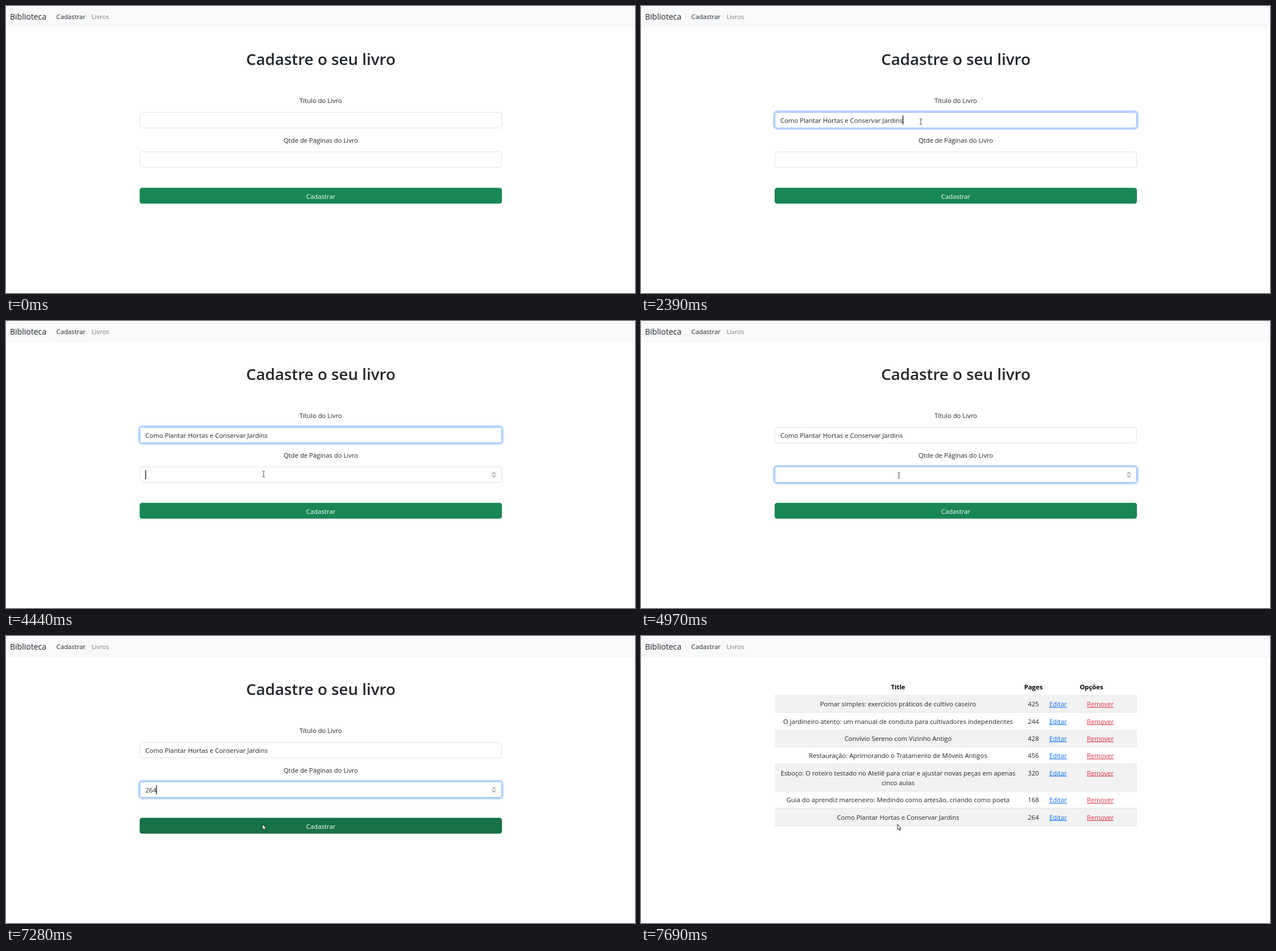
An HTML page for the animation above (8 s loop, 1106x506 px).

```html
<!DOCTYPE html>
<html lang="pt-BR">
<head>
<meta charset="utf-8">
<title>Biblioteca</title>
<style>
  html, body { margin: 0; width: 100%; height: 100%; overflow: hidden; background: #fff; }
  svg { display: block; }
  text { font: 11.3px "Open Sans", "Noto Sans", sans-serif; fill: #212529; }
  .brand { font-size: 14px; }
  .heading { font-size: 27.7px; font-weight: 600; }
  .mid { text-anchor: middle; }
  .head { font-weight: 700; fill: #000; }
  .muted { fill: #7b7c7d; }
  .edit { fill: #0d6efd; text-decoration: underline; }
  .remove { fill: #dc3545; text-decoration: underline; }
  .field { fill: #fff; stroke: #dee2e6; }
  .ring { fill: none; }
  .line { stroke: #dee2e6; }
</style>
</head>
<body>
<svg id="stage" width="1106" height="506" viewBox="0 0 1106 506">
  <rect width="1106" height="38.5" fill="#f8f9fa"/>
  <text class="brand" x="7" y="23.5">Biblioteca</text>
  <text x="88.5" y="22.5">Cadastrar</text>
  <text class="muted" x="150.5" y="22.5">Livros</text>

  <g id="form">
    <text class="heading mid" x="553.5" y="103.5">Cadastre o seu livro</text>
    <text class="mid" x="553.5" y="171">Título do Livro</text>
    <rect class="ring" id="titleRing"/>
    <rect class="field" id="titleField" x="235.5" y="187.5" width="636" height="27.5" rx="4.3"/>
    <text id="titleText" x="245" y="206"></text>
    <text class="mid" x="553.5" y="240.7">Qtde de Páginas do Livro</text>
    <rect class="ring" id="pagesRing"/>
    <rect class="field" id="pagesField" x="235.5" y="257" width="636" height="27.5" rx="4.3"/>
    <text id="pagesText" x="245" y="275.7"></text>
    <g id="spinner">
      <rect x="853.5" y="265" width="8.5" height="12" rx="1" fill="#efefef"/>
      <path d="M855.5 269.5l2.3-2.3 2.3 2.3M855.5 272.5l2.3 2.3 2.3-2.3" fill="none" stroke="#555"/>
    </g>
    <rect class="ring" id="buttonRing"/>
    <rect id="button" x="235" y="320.5" width="637" height="28" rx="4.3"/>
    <text class="mid" x="553.5" y="339.5" style="fill:#fff">Cadastrar</text>
    <rect id="caret" width="1.2" height="16" fill="#000"/>
  </g>

  <g id="table">
    <text class="head mid" x="452" y="94">Title</text>
    <text class="head mid" x="690" y="94">Pages</text>
    <text class="head mid" x="792" y="94">Opções</text>
    <path class="line" d="M235 104.5H872"/>
  </g>

  <path id="beam" d="M-2-5H-.6L0-4.4.6-5H2M0-4.4V4.4M-2 5H-.6L0 4.4.6 5H2" fill="none" stroke="#444"/>
  <path id="arrow" d="M0 0V9.6L2.2 7.6 3.7 11 5.2 10.3 3.8 7H6.6Z" fill="#fff" stroke="#222" stroke-width=".9" stroke-linejoin="round"/>
</svg>
<script>
const LOOP = 8000, BLINK = 525;
const TITLE = 'Como Plantar Hortas e Conservar Jardins';
const TIMES = { title: 1320, paste: 2390, pages: 4440, hover: 6950, submit: 7510, list: 7690 };
const DIGITS = [5370, 5960, 6220];
const RESETS = [TIMES.title, TIMES.paste, TIMES.pages, ...DIGITS];

const BOOKS = [
  [['Pomar simples: exercícios práticos de cultivo caseiro'], 425],
  [['O jardineiro atento: um manual de conduta para cultivadores independentes'], 244],
  [['Convívio Sereno com Vizinho Antigo'], 428],
  [['Restauração: Aprimorando o Tratamento de Móveis Antigos'], 456],
  [['Esboço: O roteiro testado no Ateliê para criar e ajustar novas peças em apenas', 'cinco aulas'], 320],
  [['Guia do aprendiz marceneiro: Medindo como artesão, criando como poeta'], 168],
  [[TITLE], 264]
];

// Pointer moves: start, end, number of steps, way points
const MOVES = [
  [500, 1100, 9, [[950, 594], [890, 310], [600, 226], [505, 206]]],
  [1590, 1660, 2, [[505, 206], [492, 204]]],
  [3260, 4020, 12, [[492, 204], [484, 216], [470, 236], [453, 249], [452, 258]]],
  [4090, 4300, 4, [[452, 258], [453, 270]]],
  [4700, 4700, 1, [[453, 270], [453.5, 272]]],
  [6420, 7150, 12, [[453.5, 272], [439, 282], [441, 296], [447, 324], [451, 332]]]
];

const $ = id => document.getElementById(id);
const show = (id, on) => $(id).setAttribute('display', on ? 'inline' : 'none');
const set = (el, attrs) => Object.entries(attrs).forEach(([k, v]) => el.setAttribute(k, v));

function add(name, attrs, text = '') {
  const el = document.createElementNS('http://www.w3.org/2000/svg', name);
  set(el, attrs);
  el.textContent = text;
  $('table').append(el);
}

function buildTable() {
  let y = 104.5;
  BOOKS.forEach(([lines, pages], i) => {
    const h = 30.3 + (lines.length - 1) * 17.6, base = y + 19.8;
    if (i % 2 === 0) add('rect', { x: 235, y, width: 637, height: h, fill: '#f2f2f2' });
    lines.forEach((s, n) => add('text', { class: 'mid', x: 452, y: base + n * 17.6 }, s));
    add('text', { class: 'mid', x: 690, y: base }, pages);
    add('text', { class: 'edit', x: 718, y: base }, 'Editar');
    add('text', { class: 'remove', x: 784, y: base }, 'Remover');
    y += h;
    const edge = Math.floor(y) + .5;
    add('path', { class: 'line', d: `M235 ${edge}H872` });
  });
}

const lerp = (a, b, p) => a + (b - a) * p;
const mix = (a, b, p) => `rgb(${a.map((v, i) => Math.round(lerp(v, b[i], p)))})`;

function fade(t, start) {
  const p = Math.min(1, Math.max(0, (t - start) / 150));
  return p * p * (3 - 2 * p);
}

function drawRing(id, y, p, color) {
  const s = 2.9 * p;
  set($(id), {
    x: 235 - s / 2, y: y - s / 2, width: 637 + s, height: 28 + s, rx: 4.3 + s / 2,
    stroke: `rgb(${color})`, 'stroke-width': s, 'stroke-opacity': .27 * p
  });
}

function drawField(name, y, p) {
  $(name + 'Field').style.stroke = mix([222, 226, 230], [134, 183, 254], p);
  drawRing(name + 'Ring', y, p, [13, 110, 253]);
}

function pointerAt(t) {
  const move = MOVES.filter(m => m[0] <= t).pop();
  if (!move) return null;
  const [start, end, n, pts] = move;
  const step = Math.min(n - 1, Math.floor((t - start) / (end - start || 1) * (n - 1) + .05));
  const u = (step + 1) / n * (pts.length - 1);
  const i = Math.min(pts.length - 2, Math.floor(u));
  return [0, 1].map(k => lerp(pts[i][k], pts[i + 1][k], u - i));
}

function drawCaret(t) {
  const reset = RESETS.filter(r => r <= t).pop();
  const on = reset !== undefined && t < TIMES.submit && Math.floor((t - reset) / BLINK) % 2 === 0;
  show('caret', on);
  if (!on) return;
  const first = t < TIMES.pages;
  const text = $(first ? 'titleText' : 'pagesText');
  const width = text.textContent ? text.getComputedTextLength() : 0;
  set($('caret'), { x: 245 + Math.floor(width), y: first ? 193 : 263 });
}

function render(t) {
  const listed = t >= TIMES.list;
  show('form', !listed);
  show('table', listed);

  const pos = pointerAt(t);
  const over = y => pos && !listed && pos[0] > 235 && pos[0] < 872 && pos[1] >= y && pos[1] < y + 28;
  const beam = over(187) || over(257);
  show('beam', pos && beam);
  show('arrow', pos && !beam);
  if (pos) {
    const at = `translate(${pos[0]} ${pos[1]})`;
    set($('beam'), { transform: at });
    set($('arrow'), { transform: at });
  }
  if (listed) return;

  $('titleText').textContent = t >= TIMES.paste ? TITLE : '';
  $('pagesText').textContent = '264'.slice(0, DIGITS.filter(d => d <= t).length);
  drawField('title', 187, fade(t, TIMES.title) - fade(t, TIMES.pages));
  drawField('pages', 257, fade(t, TIMES.pages) - fade(t, TIMES.submit));
  show('spinner', over(257) || (t >= TIMES.pages && t < TIMES.submit));

  const pressed = fade(t, TIMES.submit);
  $('button').style.fill = pressed > 0
    ? mix([21, 115, 71], [20, 108, 67], pressed)
    : mix([25, 135, 84], [21, 115, 71], fade(t, TIMES.hover));
  drawRing('buttonRing', 320.5, pressed, [40, 130, 170]);
  drawCaret(t);
}

buildTable();
const began = performance.now();
function tick() {
  render((performance.now() - began) % LOOP);
  requestAnimationFrame(tick);
}
tick();
</script>
</body>
</html>
```
